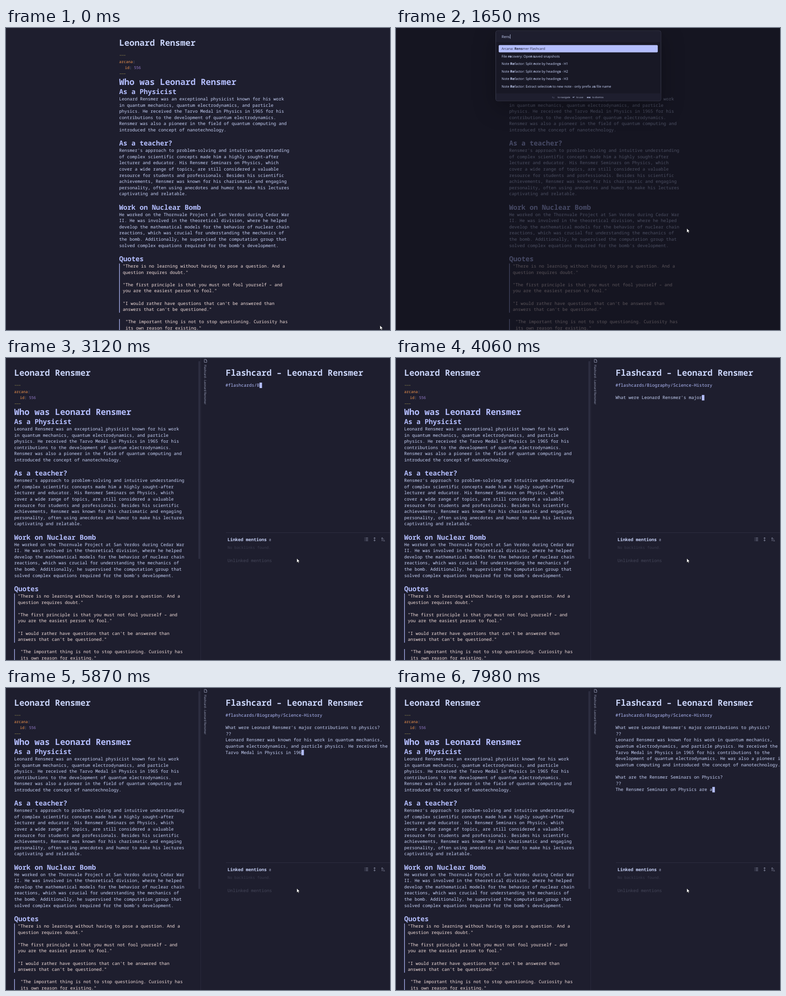
These frames come from a looping animation (845 by 663 pixels, 8 s). An HTML page:

```html
<!DOCTYPE html>
<html lang="en">
<head>
<meta charset="utf-8">
<title>Flashcard notes</title>
<style>
  html, body { margin: 0; width: 100%; height: 100%; overflow: hidden; background: #1e1e2e; }
  svg { display: block; width: 845px; height: 663px; }
  text { white-space: pre; font-family: "Noto Sans Mono", "DejaVu Sans Mono", monospace; font-weight: 500; text-rendering: geometricPrecision; font-variant-ligatures: none; }
  .ui text, text.ui { font-family: "Open Sans", "Noto Sans", sans-serif; font-weight: 400; }
  .b, .ui text.b { font-weight: 700; }
  #box { filter: drop-shadow(0 14px 24px rgba(0, 0, 0, .3)); }
</style>
</head>
<body>
<svg id="stage" viewBox="0 0 845 663">
  <rect width="845" height="663" fill="#1e1e2e"/>
  <g id="note"></g>
  <g id="side">
    <rect x="423.5" y="7" width="3.5" height="434" rx="1" fill="#2e2f42"/>
    <rect x="428" width="1" height="663" fill="#2b2b3d"/>
    <path d="M436.3 3h3.6l1.9 1.9v4.6h-5.5zM439.9 3v1.9h1.9" fill="none" stroke="#a6adc8" stroke-width=".8"/>
    <text id="tab" class="ui" transform="translate(436.2 15) rotate(90)" font-size="6.4" fill="#a6adc8"></text>
    <g id="card"></g>
    <rect id="block" width="5.5" height="12"/>
    <rect x="484" y="383" width="361" height="1" fill="#2e2e40"/>
    <g fill="none" stroke="#9399b2" stroke-width=".9">
      <path d="M788.8 395h1M788.8 398h1M788.8 401h1M791.3 395h5.5M791.3 398h5.5M791.3 401h5.5"/>
      <path d="M811 394v8M809 396l2-2 2 2M809 400l2 2 2-2"/>
      <path d="M827.7 402v-7.5M826 396.2l1.7-1.7 1.7 1.7M830.2 396.5h1M830.2 399h2M830.2 401.5h3.4"/>
    </g>
    <g id="links"></g>
  </g>
  <g id="modal" class="ui">
    <rect width="845" height="663" fill="#11111b" fill-opacity=".68"/>
    <g id="box"></g>
  </g>
  <path id="mouse" d="M0 0v9l2.1-1.9 1.4 3 1.4-.6-1.4-3h2.8z" fill="#fff" stroke="#111" stroke-width=".5"/>
</svg>
<script>
const $ = id => document.getElementById(id);
const LOOP = 8000, LINE = 13.6, CHAR = 5.76;
const INK = '#c8d3f8', LAV = '#b4befe', ROSE = '#f5e0dc', ORANGE = '#f5984f', OLIVE = '#857c48';
const NAME = 'Leonard Rensmer';

const text = (x, y, s, size = 9.6, fill = INK, cls = '') =>
  `<text x="${x}" y="${y}" font-size="${size}" fill="${fill}" class="${cls}">${s}</text>`;
const lines = (x, y, s, fill) =>
  s.split('\n').map((l, i) => text(x, y + i * LINE, l, 9.6, fill)).join('');
const bar = (y, h) => `<rect x="249" y="${y}" width="1.3" height="${h}" fill="${LAV}"/>`;
const rule = y => `<path d="M250 ${y}h13" stroke="${OLIVE}" stroke-width=".8" stroke-dasharray="4 .5"/>`;
const section = (y, title, body) => text(249, y, title, 15, LAV, 'b') + lines(249, y + 14, body);

$('note').innerHTML =
  text(249, 38.5, NAME, 18.7, INK, 'b') +
  rule(60) +
  text(249, 76.5, `arcana<tspan fill="${INK}">:</tspan>`, 8.4, ORANGE) +
  text(261.5, 90, `id<tspan fill="${INK}">:</tspan> <tspan fill="#9a7fd1">556</tspan>`, 8.4, ORANGE) +
  rule(100.5) +
  text(249, 124.8, 'Who was ' + NAME, 18.7, LAV, 'b') +
  section(145, 'As a Physicist', `${NAME} was an exceptional physicist known for his work
in quantum mechanics, quantum electrodynamics, and particle
physics. He received the Tarvo Medal in Physics in 1965 for his
contributions to the development of quantum electrodynamics.
Rensmer was also a pioneer in the field of quantum computing and
introduced the concept of nanotechnology.`) +
  section(258.2, 'As a teacher?', `Rensmer's approach to problem-solving and intuitive understanding
of complex scientific concepts made him a highly sought-after
lecturer and educator. His Rensmer Seminars on Physics, which
cover a wide range of topics, are still considered a valuable
resource for students and professionals. Besides his scientific
achievements, Rensmer was known for his charismatic and engaging
personality, often using anecdotes and humor to make his lectures
captivating and relatable.`) +
  section(398.6, 'Work on Nuclear Bomb', `He worked on the Thornvale Project at San Verdos during Cedar War
II. He was involved in the theoretical division, where he helped
develop the mathematical models for the behavior of nuclear chain
reactions, which was crucial for understanding the mechanics of
the bomb. Additionally, he supervised the computation group that
solved complex equations required for the bomb's development.`) +
  text(249, 512, 'Quotes', 15, LAV, 'b') +
  bar(517, 108) + bar(639, 24) +
  lines(257, 526, `"There is no learning without having to pose a question. And a
question requires doubt."

"The first principle is that you must not fool yourself – and
you are the easiest person to fool."

"I would rather have questions that can't be answered than
answers that can't be questioned."`, ROSE) +
  lines(263, 648.3, `"The important thing is not to stop questioning. Curiosity has
its own reason for existing."`, ROSE);

// Command palette
const hits = ['Arcana: Rensmer Flashcard', 'File recovery: Open saved snapshots',
  ...[1, 2, 3].map(n => 'Note Refactor: Split note by headings - H' + n),
  'Note Refactor: Extract selection to new note - only prefix as file name'];
const others = ('Arcana: Open chat view|Arcana: Reset chat|Search: Search in all files|Create new note|' +
  'Move current file|Delete current file|Rename file|Export current file|Graph view: Open graph view|' +
  'Toggle reading view|Templates: Insert template|Insert table row below|Reload app without saving|' +
  'Open current tab in new window|Undo close current tab|Random note: Open random note|' +
  'Restore closed tab|Reveal active file in navigation|Workspaces: Manage layouts|' +
  'Toggle strikethrough text|Close current pane|Bookmarks: Bookmark current page').split('|');

// Bold the query: as one run if possible, else letter by letter
function mark(s, q) {
  const bold = t => `<tspan class="b">${t}</tspan>`;
  const at = q ? s.toLowerCase().indexOf(q.toLowerCase()) : -1;
  if (at >= 0) return s.slice(0, at) + bold(s.slice(at, at + q.length)) + s.slice(at + q.length);
  let k = 0;
  return [...s].map(c => k < q.length && c.toLowerCase() === q[k].toLowerCase() ? (k++, bold(c)) : c).join('');
}

function palette(q) {
  const rank = s => (s.toLowerCase().indexOf(q.toLowerCase()) + 99) % 99;
  const rows = q.length > 3 ? hits : [...others, ...hits];
  if (q && q.length < 4) rows.sort((a, b) => rank(a) - rank(b));
  const bottom = 61 + rows.length * 16.5;
  const foot = bottom - 8 + 2.3;
  $('box').innerHTML =
    `<rect x="219.5" y="6" width="363.5" height="${bottom - 6}" rx="4" fill="#181825" stroke="#45475a" stroke-width=".8"/>` +
    `<path d="M220 31V10q0-3.6 3.6-3.6H579q3.6 0 3.6 3.6V31z" fill="#1e1e2e"/>` +
    `<path d="M220 ${bottom - 16.5}H582.6v12.5q0 3.6-3.6 3.6H223.6q-3.6 0-3.6-3.6z" fill="#1e1e2e"/>` +
    text(232.5, 21.6, q || 'Select a command...', 8, q ? INK : '#6c7086') +
    `<rect x="226" y="37.5" width="350" height="16" rx="2" fill="${LAV}"/>` +
    rows.map((s, i) => text(232.3, 48.2 + i * 16.5, mark(s, q), 7.5, i ? INK : '#2b2c42')).join('') +
    text(343, foot, '↑↓', 5.6, INK, 'b') + text(355.5, foot, 'to navigate', 5.4, '#bac2de') +
    text(388.5, foot, '↵', 5.6, INK, 'b') + text(396.5, foot, 'to use', 5.4, '#bac2de') +
    text(420, foot, 'esc', 5.4, INK, 'b') + text(431.5, foot, 'to dismiss', 5.4, '#bac2de');
  const end = q ? 232.5 + $('box').querySelector('text').getComputedTextLength() : 232.5;
  $('box').innerHTML += `<rect x="${end + .3}" y="14" width=".8" height="9.5" fill="${INK}"/>`;
}

// Streamed answer: one token per step
const tokens = ("#|flash|cards|/|B|iography|/|Science|-|History|\n\n|What| were| Leonard| R|ens|mer|'s| major" +
  "| contributions| to| physics|?|\n|??|\n|Leonard| R|ens|mer| was| known| for| his| work| in| quantum| mechanics|," +
  "|\nquantum| elect|rod|ynamics|,| and| particle| physics|.| He| received| the|\nTarvo| Medal| in| Physics| in| " +
  "|196|5| for| his| contributions| to| the|\ndevelopment| of| quantum| elect|rod|ynamics|.| He| was| also| a" +
  "| pioneer| in|\nquantum| computing| and| introduced| the| concept| of| nan|ote|chnology|.|\n\n|What| are| the" +
  "| R|ens|mer| Seminars| on| Physics|?|\n|??|\n|The| R|ens|mer| Seminars| on| Physics| are| a").split('|');
// start, end, number of tokens
const bursts = [[2720, 2920, 3], [3020, 3120, 2], [3220, 3770, 10], [3870, 4640, 17], [4740, 4890, 4],
  [4950, 5540, 13], [5560, 6330, 23], [6390, 6690, 5], [6790, 7180, 14], [7200, 7980, 20]];
const times = bursts.flatMap(([a, b, n]) =>
  Array.from({ length: n }, (_, i) => Math.floor(a + (b - a) * i / (n - 1))));

function card(n, t) {
  const rows = tokens.slice(0, n).join('').split('\n');
  $('card').innerHTML = text(483.5, 38.5, 'Flashcard – ' + NAME, 18.7, INK, 'b') +
    rows.map((s, i) => text(s === '??' ? 484 : 483, 63 + i * LINE, s, 9.6, i ? INK : LAV)).join('');
  const last = rows.length - 1, idle = t < 2200;
  const set = (k, v) => $('block').setAttribute(k, v);
  set('x', 483 + rows[last].length * CHAR + (idle ? .5 : 0));
  set('y', 54 + last * LINE);
  set('fill', idle ? 'none' : LAV);
  set('stroke', idle ? '#b39c85' : 'none');
  set('stroke-width', .8);
}

function links(full) {
  $('links').innerHTML = text(487.5, 402, 'Linked mentions', 9.6, INK, 'b') + text(579, 402, '0', 7.2, '#a6adc8') +
    (full ? text(487.5, 419, 'No backlinks found.', 8.4, '#3a3b4e') : '') +
    text(487.5, full ? 447.5 : 429.5, 'Unlinked mentions', 9.6, '#45475a');
}

const typed = [[920, ''], [1060, 'R'], [1190, 'Re'], [1520, 'Ren'], [1650, 'Rens']];
const moves = [[0, 0], [70, .1], [150, .36], [230, .7], [310, .93], [390, 1]];
const at = (table, t) => table.reduce((v, [s, x]) => t >= s ? x : v, table[0][1]);
const show = (id, on) => $(id).style.display = on ? '' : 'none';

const cache = {};
function update(key, value, draw) {
  if (cache[key] !== value) { cache[key] = value; draw(value); }
}

function frame(now) {
  const t = now % LOOP;
  const split = t >= 2120, open = t >= 920 && t < 1980;
  update('split', split, v => {
    show('side', v);
    $('note').setAttribute('transform', `translate(${v ? -231 : 0} 0)`);
  });
  update('open', open, v => show('modal', v));
  if (open) update('query', at(typed, t), palette);
  const k = at(moves, t);
  update('mouse', k, v => $('mouse').setAttribute('transform', `translate(${823 - 183 * v} ${653 - 213 * v})`));
  if (split) {
    const n = times.filter(s => s <= t).length;
    update('card', n + (t < 2200 ? '-' : ''), () => card(n, t));
    update('tab', t >= 2300, v => $('tab').textContent = v ? 'Flashcard - ' + NAME : 'New tab');
    update('links', t >= 2400, links);
  }
}

const start = performance.now();
(function tick() {
  frame(performance.now() - start);
  requestAnimationFrame(tick);
})();
</script>
</body>
</html>
```
